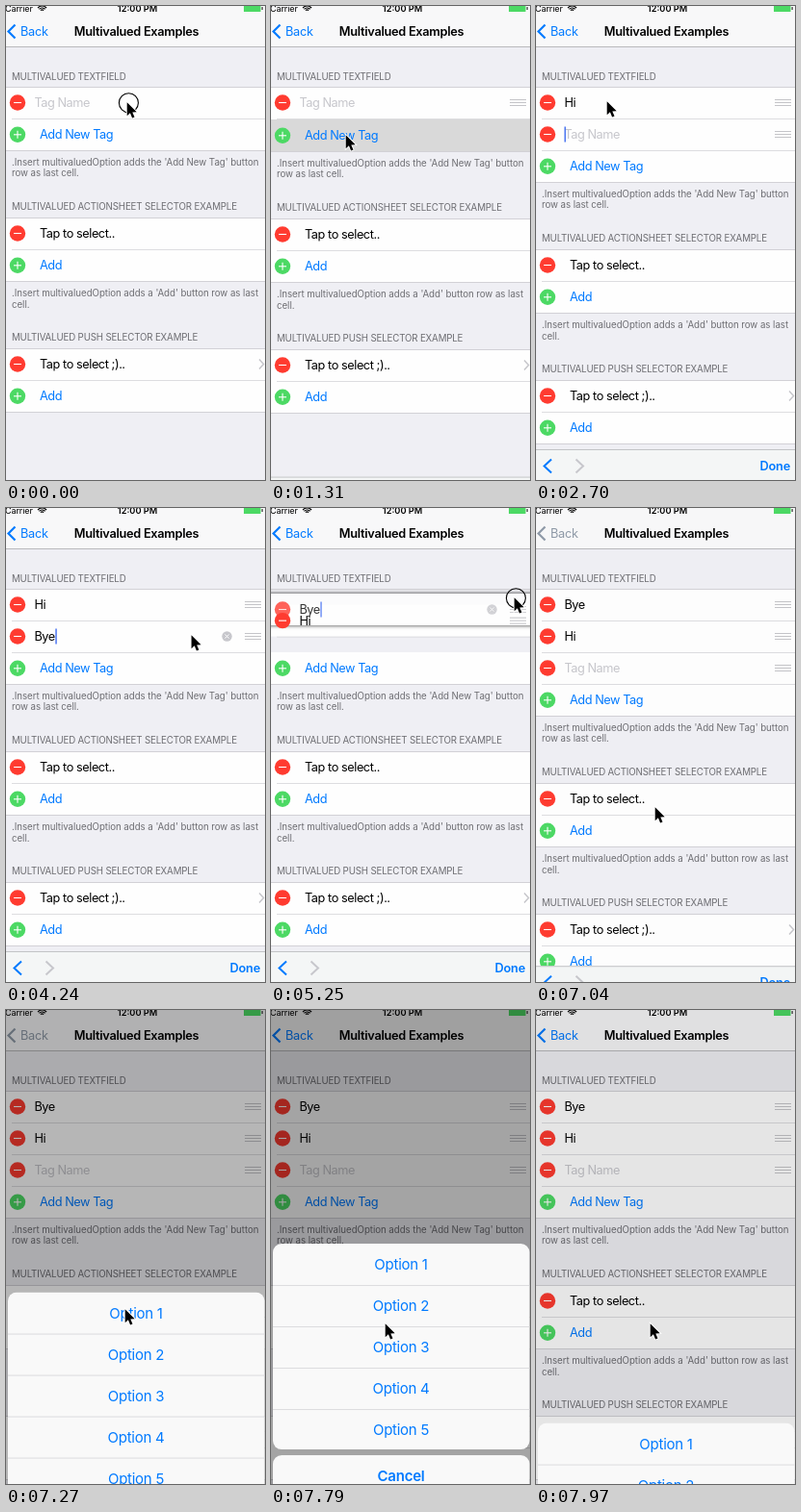
Write an HTML page with a canvas that moves like this. It is 269 by 493 pixels and loops after 8000 ms.

```html
<!DOCTYPE html>
<html lang="en">
<head>
<meta charset="utf-8">
<title>Multivalued Examples</title>
<style>
  html, body { margin: 0; width: 100%; height: 100%; overflow: hidden; background: #efeff4; }
  canvas { display: block; width: 269px; height: 493px; }
</style>
</head>
<body>
<canvas></canvas>
<script>
const W = 269, H = 493, LOOP = 8000, ROW = 33, TOP = 84;
const BLUE = '#007aff', RED = '#ff3b30', GREEN = '#4cd964', GRAY = '#c7c7cc';
const LINE = '#d2d1d6', LABEL = '#6d6d72', PAGE = '#efeff4', CELL = '#fefefe';

const canvas = document.querySelector('canvas');
const ctx = canvas.getContext('2d');
const dpr = window.devicePixelRatio || 1;
canvas.width = W * dpr;
canvas.height = H * dpr;

// Cursor path: time, x, y
const PATH = [
  [0, 126, 101], [360, 126, 101], [780, 78, 135], [1480, 78, 135], [1820, 74, 100],
  [3950, 74, 100], [4420, 250, 149], [4760, 253, 122], [4850, 253, 122], [5413, 253, 87],
  [5550, 253, 87], [6000, 130, 168], [6150, 130, 168], [6430, 132, 309], [6840, 124, 312],
  [7270, 124, 312], [7620, 119, 327], [LOOP, 119, 327]
];
const PRESSES = [[0, 60], [1200, 1260], [1880, 1940], [4770, 5440], [6080, 6140], [6860, 6920], [7680, 7740]];

function ramp(t, from, to) {
  const p = Math.min(1, Math.max(0, (t - from) / (to - from)));
  return p * p * (3 - 2 * p);
}

function cursorAt(t) {
  const i = PATH.findIndex(key => key[0] > t);
  const [t0, x0, y0] = PATH[i - 1], [t1, x1, y1] = PATH[i];
  const p = ramp(t, t0, t1);
  return { x: x0 + (x1 - x0) * p, y: y0 + (y1 - y0) * p };
}

function typed(t, steps) {
  return steps.reduce((text, [time, next]) => t >= time ? next : text, '');
}

function withAlpha(alpha, draw) {
  ctx.save();
  ctx.globalAlpha *= alpha;
  draw();
  ctx.restore();
}

function rect(x, y, w, h, color) {
  ctx.fillStyle = color;
  ctx.fillRect(x, y, w, h);
}

function disc(x, y, r, color) {
  ctx.fillStyle = color;
  ctx.beginPath();
  ctx.arc(x, y, r, 0, Math.PI * 2);
  ctx.fill();
}

function stroke(points, color, width) {
  ctx.strokeStyle = color;
  ctx.lineWidth = width;
  ctx.beginPath();
  points.forEach(([x, y]) => ctx.lineTo(x, y));
  ctx.stroke();
}

// Draws text whose capitals are centred on y
function text(str, x, y, color, { size = 12.75, weight = 400, spacing = -0.45, align = 'left' } = {}) {
  ctx.font = `${weight} ${size}px Inter, Roboto, sans-serif`;
  ctx.letterSpacing = spacing + 'px';
  ctx.textAlign = align;
  ctx.fillStyle = color;
  ctx.fillText(str, x, y + size * 0.36);
}

function header(str, y) {
  text(str, 6, y, LABEL, { size: 9.7, spacing: -0.14 });
}

function footer(str, y) {
  text(str, 6, y, LABEL, { size: 9.7, spacing: -0.04 });
}

function badge(y, isPlus) {
  disc(12, y, 8.2, isPlus ? GREEN : RED);
  stroke([[8, y], [16, y]], '#fff', 1.1);
  if (isPlus) stroke([[12, y - 4], [12, y + 4]], '#fff', 1.1);
}

function chevron(x, y, w, h, color, width) {
  stroke([[x, y - h], [x + w, y], [x, y + h]], color, width);
}

function handle(y) {
  for (const dy of [-3, 0, 3]) rect(248, y + dy - 0.5, 17, 1, '#c4c4c8');
}

function separator(y) {
  rect(6, y, W, 1, '#dddde0');
}

function section(y, height) {
  rect(0, y, W, height, CELL);
  rect(0, y, W, 1, LINE);
  rect(0, y + height, W, 1, LINE);
}

function tagContent(value, y, focused) {
  badge(y, false);
  text(value || 'Tag Name', 29.4, y, value ? '#000' : GRAY);
  if (!focused) return;
  const caretX = value ? 30 + ctx.measureText(value).width : 29.5;
  rect(caretX, y - 8, 1.4, 16, '#3f6cf0');
  if (!value) return;
  disc(229.5, y, 5.2, GRAY);
  stroke([[227.5, y - 2], [231.5, y + 2]], '#fff', 1);
  stroke([[231.5, y - 2], [227.5, y + 2]], '#fff', 1);
}

function tagRow(value, top, focused, handleAlpha = 1) {
  const y = top + ROW / 2;
  tagContent(value, y, focused);
  withAlpha(handleAlpha, () => handle(y));
  separator(top + ROW);
}

function liftedRow(value, top, lift) {
  const y = top + ROW / 2;
  ctx.save();
  ctx.shadowColor = `rgba(0,0,0,${0.85 * lift})`;
  ctx.shadowBlur = 4 * dpr;
  // Only the shadow outside the row stays visible
  ctx.beginPath();
  ctx.rect(0, top - 8, W, 8);
  ctx.rect(0, top + ROW, W, 8);
  ctx.clip();
  rect(-10, top, W + 20, ROW, '#fff');
  ctx.restore();
  withAlpha(1 - 0.2 * lift, () => {
    rect(0, top, W, ROW, CELL);
    tagContent(value, y, true);
    handle(y);
  });
}

function addRow(label, top) {
  badge(top + ROW / 2 + 0.3, true);
  text(label, 35, top + ROW / 2 + 0.3, BLUE);
}

function tagSection(t, cursor, inserted, focus) {
  const addTop = TOP + ROW * (1 + inserted);
  const hiTop = TOP + ROW * ramp(t, 5100, 5400);
  const hi = typed(t, [[2410, 'H'], [2470, 'Hi']]);
  const bye = typed(t, [[3360, 'B'], [3440, 'By'], [3600, 'Bye']]);
  const lift = ramp(t, 4770, 4880) - ramp(t, 5440, 5550);

  header('MULTIVALUED TEXTFIELD', 74);
  section(TOP, ROW * (2 + inserted));

  if (lift === 0 && inserted > 0) {
    withAlpha(Math.min(1, inserted), () => tagRow(bye, t < 5000 ? TOP + ROW : TOP, focus === 1));
  }
  if (inserted > 1) withAlpha(inserted - 1, () => tagRow('', TOP + 2 * ROW, focus === 2));

  const highlight = start => t >= start ? 1 - ramp(t, start + 200, start + 500) : 0;
  const pressed = t < 4000 ? highlight(1200) : highlight(6090);
  rect(0, addTop + 1, W, ROW - 1, CELL);
  withAlpha(pressed, () => rect(0, addTop, W, ROW, '#d9d9d9'));
  addRow('Add New Tag', addTop);

  if (lift > 0) {
    // Slots without a row show the page behind them
    rect(0, TOP + 1, W, ROW * 2 - 1, PAGE);
    rect(0, hiTop, W, ROW, CELL);
    const dragged = TOP + ROW + cursor.y - 122;
    liftedRow(bye, dragged + (TOP - dragged) * ramp(t, 5440, 5550), lift);
  }
  tagRow(hi, hiTop, focus === 0, ramp(t, 1200, 1290));
}

function selectorSection(title, first, top) {
  header(title, top - 11.5);
  section(top, ROW * 2);
  badge(top + ROW / 2, false);
  text(first, 35, top + ROW / 2, '#000');
  separator(top + ROW);
  addRow('Add', top + ROW);
}

function lowerSections(shift) {
  footer(".Insert multivaluedOption adds the 'Add New Tag' button", 162.4 + shift);
  footer('row as last cell.', 173.6 + shift);
  selectorSection('MULTIVALUED ACTIONSHEET SELECTOR EXAMPLE', 'Tap to select..', 220 + shift);
  footer(".Insert multivaluedOption adds a 'Add' button row as last", 298.7 + shift);
  footer('cell.', 310.7 + shift);
  selectorSection('MULTIVALUED PUSH SELECTOR EXAMPLE', 'Tap to select ;)..', 356 + shift);
  chevron(263, 372.5 + shift, 4.5, 5, GRAY, 1.5);
}

function navBar(tint) {
  rect(0, 0, W, 42, '#f8f8f9');
  rect(0, 42, W, 1, '#b9b9bc');
  text('Carrier', -1, 2.5, '#000', { size: 9, spacing: -0.1 });
  for (const r of [2, 4, 6]) {
    ctx.strokeStyle = '#000';
    ctx.lineWidth = 1.2;
    ctx.beginPath();
    ctx.arc(37.5, 6, r, -Math.PI * 0.77, -Math.PI * 0.23);
    ctx.stroke();
  }
  text('12:00 PM', 136.5, 2.5, '#000', { size: 9.2, weight: 600, spacing: 0, align: 'center' });
  rect(247, 0, 17.5, 6, GREEN);
  rect(265.5, 1, 1.2, 3, '#333');
  chevron(9.5, 26.5, -7, 7, tint, 2.2);
  text('Back', 15, 26.5, tint, { spacing: -0.3 });
  text('Multivalued Examples', 135.5, 26.5, '#000', { weight: 600, spacing: -0.28, align: 'center' });
}

function toolbar(top, prevEnabled) {
  const y = top + 17.5;
  rect(0, top, W, 40, '#f4f6f6');
  rect(0, top, W, 1, '#c2c4c6');
  chevron(16, y, -7.5, 7, prevEnabled ? BLUE : GRAY, 2);
  chevron(41.5, y, 7.5, 7, prevEnabled ? GRAY : BLUE, 2);
  text('Done', 264, y, BLUE, { weight: 600, spacing: -0.2, align: 'right' });
}

function sheetPanel(top, labels, weight, pressedIndex) {
  const pitch = 43;
  ctx.save();
  ctx.beginPath();
  ctx.roundRect(2, top, 266.5, pitch * labels.length - 1, 9);
  ctx.clip();
  rect(0, top, W, pitch * labels.length, '#f9f9f9');
  labels.forEach((label, i) => {
    const y = top + pitch * i;
    if (i === pressedIndex) rect(0, y, W, pitch, '#e6e6e6');
    if (i) rect(0, y, W, 1, '#dcdcde');
    text(label, 135, y + 21.7, BLUE, { size: 15, weight, spacing: -0.25, align: 'center' });
  });
  ctx.restore();
}

function actionSheet(top, pressed) {
  const options = [1, 2, 3, 4, 5].map(n => `Option ${n}`);
  sheetPanel(top, options, 400, pressed ? 2 : -1);
  sheetPanel(top + 220, ['Cancel'], 600, -1);
}

function pointer({ x, y }, pressed) {
  if (pressed) {
    ctx.strokeStyle = '#000';
    ctx.lineWidth = 1.1;
    ctx.beginPath();
    ctx.arc(x + 1.4, y - 0.3, 10, 0, Math.PI * 2);
    ctx.stroke();
  }
  const shape = [[0, 0], [0, 14], [3.2, 11], [5.4, 16.2], [7.8, 15.2], [5.6, 10.2], [10, 10]];
  ctx.beginPath();
  shape.forEach(([dx, dy]) => ctx.lineTo(x + dx - 0.3, y + dy - 0.8));
  ctx.closePath();
  ctx.strokeStyle = '#fff';
  ctx.lineWidth = 1.8;
  ctx.stroke();
  ctx.fillStyle = '#000';
  ctx.fill();
}

function focusAt(t) {
  if (t < 1280 || t >= 6920) return -1;
  if (t < 1940) return 1;
  if (t < 2700) return 0;
  return t < 6170 ? 1 : 2;
}

function draw(t) {
  const cursor = cursorAt(t);
  const pressed = PRESSES.some(([from, to]) => t >= from && t < to);
  const inserted = ramp(t, 1280, 1580) + ramp(t, 6160, 6480);
  const focus = focusAt(t);
  const toolbarShown = ramp(t, 1250, 1550) - ramp(t, 6920, 7170);
  const sheetShown = ramp(t, 7020, 7390) - ramp(t, 7740, 8086);
  const dimmedTint = t >= 7020 && t < 7740;
  const focusOnTop = focus === 0 || (focus === 1 && t >= 5500);

  ctx.setTransform(dpr, 0, 0, dpr, 0, 0);
  rect(0, 0, W, H, PAGE);
  lowerSections(ROW * inserted);
  tagSection(t, cursor, inserted, focus);
  navBar(dimmedTint ? '#8f9aa8' : BLUE);
  if (toolbarShown > 0) toolbar(H - 32 * toolbarShown, !focusOnTop);
  if (sheetShown > 0) {
    rect(0, 0, W, H, `rgba(0,0,0,${0.38 * sheetShown})`);
    actionSheet(500 - 273 * sheetShown, pressed);
  }
  pointer(cursor, pressed);
}

function frame() {
  draw(performance.now() % LOOP);
  requestAnimationFrame(frame);
}
frame();
</script>
</body>
</html>
```
